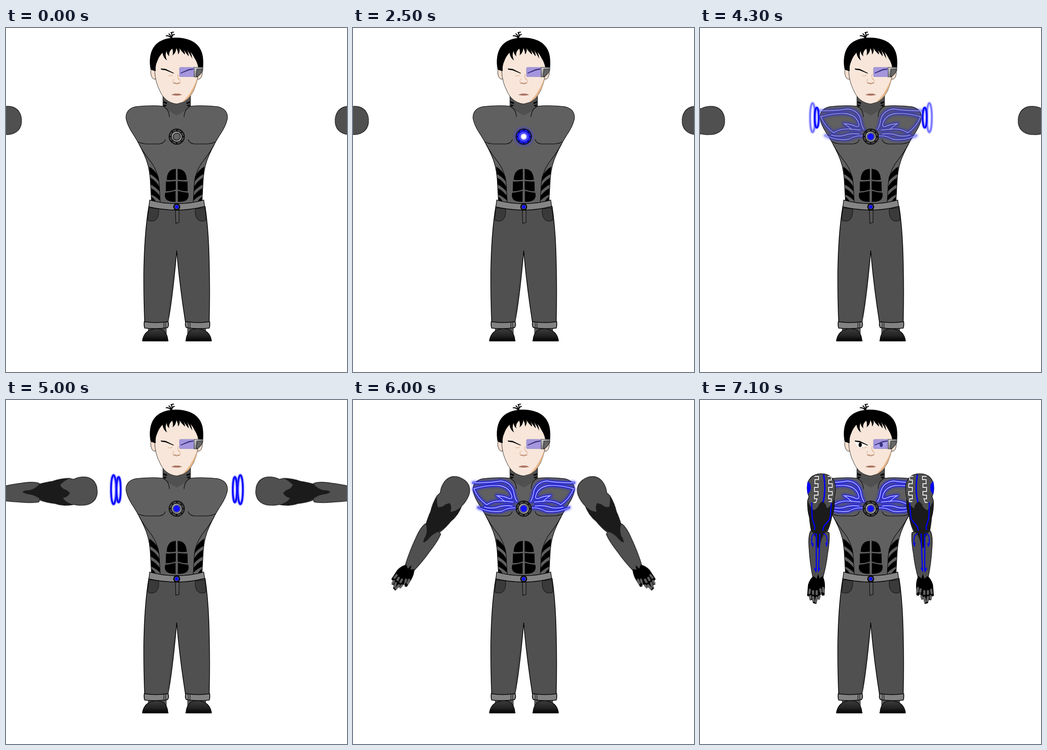
An HTML page without scripts that plays this animation: 745 by 752 pixels, repeating every 7.2 s.

```html
<!DOCTYPE html>
<html lang="en">
<head>
<meta charset="utf-8">
<title>Armour assembly</title>
<style>
html, body { margin: 0; width: 100%; height: 100%; overflow: hidden; background: #fff; }
svg { display: block; width: 745px; height: 752px; stroke-width: 1.1px; }
.ink { stroke: #000; stroke-linejoin: round; }
.line { fill: none; stroke: #000; stroke-linecap: round; }

.core, .glow, .halo, .lines, .slide, .turn, .outer, .inner, .marks, .eyes {
  animation: 7.2s infinite step-end;
}
.core { animation-name: core; }
.glow { animation-name: glow; }
.halo { animation-name: halo; }
.lines { animation-name: lines; }
.outer { animation-name: outer; }
.inner { animation-name: inner; }
.slide { animation-name: slide; }
.turn { animation-name: turn; transform-origin: 265px 191px; }
.inner, .outer { transform-origin: 240px 196px; }
.marks, .eyes { animation-name: reveal; }
.left { --far: -261px; --near: -241px; }
.right { --far: -269px; --near: -245px; }

@keyframes core { 0% { opacity: 0 } 13.88%, 100% { opacity: 1 } }
@keyframes glow {
  0% { opacity: 0 }
  20.83% { opacity: .4 }
  27.77% { opacity: .8 }
  34.72% { opacity: 1 }
  44.44% { opacity: 1; animation-timing-function: steps(8) }
  55.55%, 100% { opacity: 0 }
}
@keyframes halo {
  0% { opacity: 0 }
  34.72% { opacity: .6; animation-timing-function: steps(7) }
  44.44% { opacity: 1; animation-timing-function: steps(8) }
  55.55%, 100% { opacity: 0 }
}
@keyframes lines {
  0% { opacity: 0 }
  44.44% { opacity: 0; animation-timing-function: steps(8) }
  55.55% { opacity: 1; animation-timing-function: steps(3) }
  59.72% { opacity: .65; animation-timing-function: steps(5) }
  66.66% { opacity: 0 }
  69.44% { opacity: 0; animation-timing-function: steps(6) }
  77.77%, 100% { opacity: 1 }
}
@keyframes outer {
  0% { opacity: 0; transform: translate(27px) }
  50% { opacity: 0; transform: translate(27px); animation-timing-function: steps(3) }
  54.16% { opacity: .6; transform: none }
  55.55% { opacity: .1; transform: translate(27px); animation-timing-function: steps(3) }
  59.72% { opacity: .55; transform: translate(11px); animation-timing-function: steps(4) }
  65.27% { opacity: 1; transform: none }
  69.44% { opacity: 1; transform: none; animation-timing-function: steps(4) }
  75%, 100% { opacity: 0; transform: none }
}
@keyframes inner {
  0% { opacity: 0; transform: translate(16px) scaleY(.7) }
  50% { opacity: 0; transform: translate(16px) scaleY(.7); animation-timing-function: steps(3) }
  54.16% { opacity: .6; transform: none }
  55.55% { opacity: .3; transform: translate(16px) scaleY(.7); animation-timing-function: steps(3) }
  59.72% { opacity: 1; transform: translate(9px) scaleY(.8); animation-timing-function: steps(4) }
  65.27% { opacity: 1; transform: none }
  69.44% { opacity: 1; transform: none; animation-timing-function: steps(4) }
  75%, 100% { opacity: 0; transform: none }
}
@keyframes slide {
  0% { transform: translate(var(--far), 11px) }
  55.55% { transform: translate(var(--far), 11px); animation-timing-function: steps(3) }
  59.72% { transform: translate(var(--near), 11px); animation-timing-function: steps(3) }
  63.88% { transform: translate(-188px, 9px); animation-timing-function: steps(4) }
  69.44% { transform: translate(-95.5px, 8px); animation-timing-function: steps(3) }
  73.61% { transform: translate(-57px, 7px); animation-timing-function: steps(3) }
  77.77% { transform: translate(-41px, 7px) }
  86.11% { transform: translate(-41px, 6px); animation-timing-function: steps(2) }
  88.88%, 100% { transform: none }
}
@keyframes turn {
  0% { transform: rotate(86deg) }
  77.77% { transform: rotate(86deg); animation-timing-function: steps(4) }
  83.33% { transform: rotate(28.5deg); animation-timing-function: steps(2) }
  86.11%, 100% { transform: none }
}
@keyframes reveal {
  0% { opacity: 0 }
  87.5% { opacity: 0; animation-timing-function: steps(8) }
  98.61%, 100% { opacity: 1 }
}
</style>
</head>
<body>
<svg viewBox="0 0 745 752">
<defs>
  <filter id="soft" x="-30%" y="-30%" width="160%" height="160%"><feGaussianBlur stdDeviation="2.6"/></filter>
  <filter id="fine" x="-100%" y="-20%" width="300%" height="140%"><feGaussianBlur stdDeviation="1.2"/></filter>
  <linearGradient id="shoe" x2="0" y2="1"><stop stop-color="#3c3c3c"/><stop offset=".6" stop-color="#222"/><stop offset="1"/></linearGradient>
  <linearGradient id="steel" x2="1" y2="1"><stop stop-color="#ddd"/><stop offset=".5" stop-color="#888"/><stop offset="1" stop-color="#ccc"/></linearGradient>
  <radialGradient id="halo"><stop offset=".5" stop-color="#22f"/><stop offset=".72" stop-color="#33f" stop-opacity=".65"/><stop offset="1" stop-color="#44f" stop-opacity="0"/></radialGradient>
  <radialGradient id="hot"><stop offset=".4" stop-color="#fff"/><stop offset=".65" stop-color="#b9b9ff"/><stop offset="1" stop-color="#22f" stop-opacity="0"/></radialGradient>

  <g id="trim">
    <g class="line">
      <path d="M343 171Q356 177 357 194M289 249Q296 253 308 253.500H334Q345 253 348 244"/>
      <path d="M291 255Q299 270 313 288Q333 312 335 345L337 381"/>
    </g>
    <path d="M313 303Q326 311 333 325L335 337Q326 325 314 319ZM315 327Q328 334 335 347L336 358Q327 348 316 342ZM317 350Q329 357 336 367V377Q328 369 317 364ZM318 369Q324 373 328 381H318Z"/>
    <path d="M371 308V331.500Q360 333 351 332Q352 308 371 308ZM349.500 335.500Q360 336 371 334.500V353Q361 357 349 357ZM348 360Q360 359 370.500 356V380Q346 381 347 364Z"/>
    <path d="M344 160l8 3-1 3-7-2ZM344 167l8 2-6 3Z"/>
  </g>
  <g id="leg">
    <path fill="#555" d="M310 654h41v14h-41z"/>
    <path class="ink" fill="url(#shoe)" d="M298 684Q300 668 313 661Q328 654 343 660Q353 668 354 684Z"/>
    <path stroke="#000" stroke-width="3" d="M298 683.500H354.500"/>
    <path class="ink" fill="#828282" stroke-width="1.600" d="M302 642Q326 646 354 642Q357 649 353 655Q328 659 303 656Q301 650 302 642Z"/>
    <path class="line" d="M345 644v11M350 643q-3 5 0 12"/>
  </g>

  <g id="arm">
    <path class="ink" fill="#505050" d="M241 287Q236 300 238 322Q240 358 247 391H268Q276 362 279 335Q284 305 282 290Q260 279 241 287Z"/>
    <path class="ink" fill="#505050" d="M265 161C285 161 296 174 296 193Q296 205 293 214Q296 236 288 255Q285 272 279 286Q260 296 243 286Q240 270 239 257Q234 240 235 220L238 211Q234 202 234 192C234 174 245 161 265 161Z"/>
    <path fill="#1b1b1b" d="M235 219Q239 231 248 241Q258 237 260 228L267 221Q276 226 277 237Q287 232 293 216Q296 236 288 255Q284 274 278 284Q266 298 264 310Q261 323 257 324Q254 318 255 309Q253 296 243 286Q240 270 239 257Q234 240 235 219Z"/>
    <path d="M248 385L255 391 258 380 261 390 268 385Q273 394 273 407L272 427 267 428 264 421 261 437 257 435 254 446 247 444 245 437 240 438 239 430 234 428 236 404Q240 390 248 385Z"/>
    <path stroke="#606060" stroke-width="5" stroke-linecap="round" d="M240 415l-1 7M247 418v6M255 418v7M263 414l1 5M247 431l1 8M255 432l-2 9M241 429v5M261 429l-1 4M269 411l1 8"/>
    <path class="line" d="M240 406q14 8 30-2M241 424q14 6 28-1"/>
  </g>
  <g id="marks" fill="none">
    <path fill="#00f" d="M235 178Q242 181 242 191T235 206Q233 191 235 178Z"/>
    <path stroke="#e8e8e8" stroke-width="1.800" d="M250 167h9v7h-8v9h7v8h-8v9h8v8h-8v8h6l-3 8h-5M279 167h8v8h-6v8h8v8h-8v9h8v8h-8v8h6v6h-6"/>
    <path stroke="#00f" stroke-width="3" d="M270 163Q276 194 269 224"/>
    <path stroke="#00f" stroke-width="2.500" d="M244 224L245 258 251 277 250 284M287 225L284 260 270 277 268 286M254 292V374M262 292L259 374"/>
    <path stroke="#00f" stroke-width="2" d="M252 292Q241 294 245 316M269 292Q280 294 277 316"/>
    <path fill="#00f" d="M248 366l5 3 1 10ZM264 366l-5 3-2 10ZM242 311l3 3 4-1-3 9ZM274 311l3 3 3-2-4 10Z"/>
  </g>

  <g id="veins">
    <path d="M263 181Q300 181 322 177Q345 179 351 200Q353 214 358 222"/>
    <path d="M264 194Q296 185 320 187Q341 191 346 207Q350 218 340 215Q330 210 314 209Q324 214 331 222"/>
    <path d="M264 194Q273 216 292 229Q308 219 329 221L350 223"/>
    <path d="M274 235Q300 247 325 243Q342 234 356 236"/>
    <path d="M287 234Q300 238 314 235Q330 229 348 232"/>
  </g>
  <g id="flow" fill="none" stroke-linecap="round" stroke-linejoin="round">
    <use href="#veins" stroke="#1a1aff" stroke-width="8" opacity=".65" filter="url(#soft)"/>
    <use href="#veins" stroke="#1414e6" stroke-width="4"/>
    <use href="#veins" stroke="#b4b4ff" stroke-width="1.900"/>
  </g>
  <g id="ringA" fill="none">
    <ellipse cx="235" cy="196" rx="5.500" ry="32" stroke="#55f" stroke-width="5" filter="url(#fine)"/>
    <ellipse cx="235" cy="196" rx="5.500" ry="32" stroke="#00f" stroke-width="3"/>
  </g>
  <g id="ringB" fill="none">
    <ellipse cx="246" cy="196" rx="4.500" ry="28" stroke="#55f" stroke-width="5" filter="url(#fine)"/>
    <ellipse cx="246" cy="196" rx="4.500" ry="28" stroke="#00f" stroke-width="3"/>
  </g>
  <circle id="bolts" cx="373" cy="237.500" r="14" fill="none" stroke-width="3" stroke-linecap="round" stroke-dasharray="0 10.996"/>
</defs>

<!-- trousers -->
<path class="ink" fill="#505050" stroke-width="1.500" d="M312 390Q302 450 301 540Q301 600 303 643Q328 648 354 643Q364 590 373 487Q379 560 392 643Q420 648 444 643Q446 560 443 480Q441 430 435 390Z"/>
<path fill="#474747" d="M373 487Q362 560 355 640L352 642Q362 545 373 487Z"/>
<use href="#leg"/>
<use href="#leg" transform="translate(747 0) scale(-1 1)"/>
<g class="ink" fill="#3a3a3a" stroke-width=".8">
  <path d="M313 393Q308 417 311 421Q327 426 332 412Q335 402 333 395Z"/>
  <path d="M434 393Q439 417 436 421Q420 426 415 412Q412 402 414 395Z"/>
</g>
<path class="ink" fill="#555" d="M370 396h8v29l-7 2Z"/>

<!-- torso -->
<path class="ink" fill="#555" d="M343 148V176H403V148Z"/>
<path class="ink" fill="#606060" d="M343 171Q320 168 283 172Q262 177 262 196Q264 212 279 234Q291 253 301 275Q313 300 315 330L318 384H428L431 330Q433 300 445 275Q455 253 467 234Q482 212 484 196Q484 177 463 172Q426 168 403 171Z"/>
<path fill="#606060" d="M344 166h58v10h-58z"/>
<path fill="#505050" d="M344 152H402V173Q388 184 373 191Q358 184 344 173Z"/>
<use href="#trim"/>
<use href="#trim" transform="translate(746 0) scale(-1 1)"/>
<path class="ink" fill="#858585" stroke-width="1.300" d="M314 376Q342 384 373 384Q404 384 432 376L434 390Q404 398 373 398Q342 398 312 391Z"/>
<circle cx="373" cy="391" r="7.500"/>
<circle cx="373" cy="391" r="5.300" fill="#555"/>
<circle cx="373" cy="391" r="4" fill="#11f"/>

<!-- head -->
<g class="ink" fill="#f6dfcf" stroke-width=".8">
  <path d="M326 91Q316 87 316 96Q317 110 324 112L329 111Z"/>
  <path d="M420 91Q430 87 429 97Q428 111 421 112L416 111Z"/>
</g>
<path class="ink" fill="#f8e6da" stroke-width=".8" d="M325 42V95Q326 118 336 137Q347 163 373 166Q398 162 410 137Q420 114 421 90V42Z"/>
<path fill="#e6b688" d="M419 106Q416 126 408 140Q399 157 384 163Q398 150 405 137Q413 124 419 106Z"/>
<path d="M325 94L316 91Q313 76 315 63Q321 22 371 21Q423 22 430 62Q432 78 430 91L421 94Q420 78 412 66Q408 58 403 52Q406 59 407 67Q401 56 395 47Q399 54 399 62Q392 54 387 45Q391 51 391 58Q383 51 379 44Q381 51 376 58Q376 50 372 44Q372 53 364 60Q366 52 363 45Q354 53 357 62Q351 57 351 50Q346 60 352 71Q343 65 342 54Q334 62 330 74Q326 82 327 94Z"/>
<path class="line" stroke-width="2.200" d="M362 24Q358 16 350 17M362 23Q359 14 356 13M361 23Q364 14 361 10L366 9M362 23Q362 15 368 14"/>

<g class="eyes">
  <path fill="#fff" d="M338 91L365 98Q361 104 350 104Q342 102 338 91ZM382 98L409 91Q405 103 397 104Q386 104 382 98Z"/>
  <ellipse cx="350" cy="98" rx="3.500" ry="5"/>
  <ellipse cx="396" cy="98" rx="3.500" ry="5"/>
</g>
<path d="M338 88.500L349 89.500 367 98.500 366 99.500 349 92.500 339 91ZM410 88.500L399 90 381 98 382 99.500 400 92.500 409 91Z"/>
<path fill="none" stroke="#d9a98c" d="M354 104q6 2 10-1M376 101Q374 108 378 113M367 111Q363 116 366 121Q370 118 373 121Q377 118 380 121Q382 115 378 111"/>
<path fill="none" stroke="#8c5a42" d="M366 121q3-2 5 1h4q2-3 4-1"/>
<path fill="#b98272" d="M362 146Q369 142 373 143.500Q378 142 384 146Q373 150 362 146Z"/>
<path fill="none" stroke="#875448" stroke-width=".8" d="M362 146q11-1 22 0"/>
<rect x="379" y="86" width="35" height="20.500" rx="3" fill="#6558df" fill-opacity=".56" stroke="#9b94c4"/>
<path fill="url(#steel)" stroke="#444" d="M411 86H430V93L420 94 419 107H411Z"/>
<path fill="#666" stroke="#222" d="M417 90H429V94Q424 104 416 107Z"/>

<!-- chest circuits -->
<g class="lines">
  <use href="#flow"/>
  <use href="#flow" transform="translate(746 0) scale(-1 1)"/>
</g>

<!-- reactor -->
<circle class="halo" cx="373" cy="237.500" r="25" fill="url(#halo)"/>
<circle cx="373" cy="237.500" r="17.500"/>
<circle cx="373" cy="237.500" r="14" fill="none" stroke="#444" stroke-width="4"/>
<use href="#bolts" stroke="#000"/>
<circle cx="373" cy="237.500" r="9.800" fill="#222" stroke="url(#steel)" stroke-width="2"/>
<circle cx="373" cy="237.500" r="7" fill="#666"/>
<g class="core">
  <circle cx="373" cy="237.500" r="8" fill="#66a"/>
  <circle cx="373" cy="237.500" r="6.800" fill="#11f"/>
</g>
<g class="glow">
  <circle cx="373" cy="237.500" r="15.500" fill="#11f" fill-opacity=".85"/>
  <use href="#bolts" stroke="#00006a"/>
  <circle cx="373" cy="237.500" r="10" fill="none" stroke="#5a5aff" stroke-width="1.500"/>
  <circle cx="373" cy="237.500" r="9.500" fill="url(#hot)"/>
</g>

<!-- rings and arms -->
<g class="left">
  <use class="outer" href="#ringA"/>
  <use class="inner" href="#ringB"/>
  <g class="slide"><g class="turn"><use href="#arm"/><use class="marks" href="#marks"/></g></g>
</g>
<g transform="translate(745 0) scale(-1 1)"><g class="right">
  <use class="outer" href="#ringA" x="-2"/>
  <use class="inner" href="#ringB" x="-1"/>
  <g class="slide"><g class="turn"><use href="#arm"/><use class="marks" href="#marks"/></g></g>
</g></g>
</svg>
</body>
</html>
```
